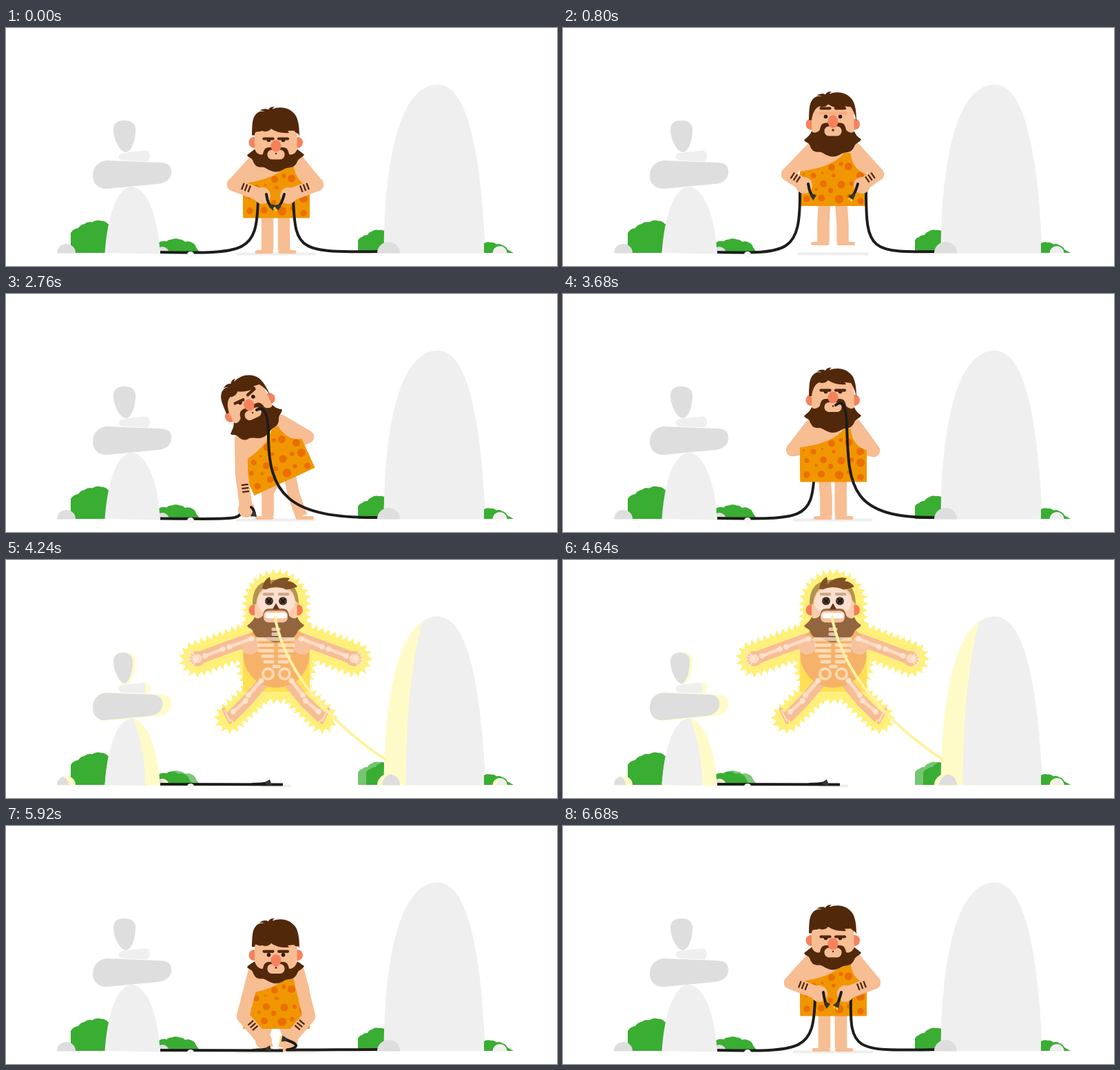
These frames come from a looping animation (800x345 px, 6720 ms). An HTML page with a canvas:

```html
<!DOCTYPE html>
<html lang="en">
<head>
<meta charset="utf-8">
<title>Caveman and cables</title>
<style>
  html, body { margin: 0; width: 100%; height: 100%; overflow: hidden; background: #fff; }
  canvas { display: block; width: 800px; height: 345px; }
</style>
</head>
<body>
<canvas id="stage"></canvas>
<script>
const LOOP = 6720;
const canvas = document.getElementById('stage');
const ctx = canvas.getContext('2d');
const dpr = window.devicePixelRatio || 1;
canvas.width = 800 * dpr;
canvas.height = 345 * dpr;

const SKIN = '#f7bd93', BROWN = '#52280b', ORANGE = '#f09600', SPOT = '#ea6e05',
  PINK = '#f5825c', BLACK = '#1d1d1b', GREEN = '#3aad33', PALE = '#efefef',
  GREY = '#dedede', GLOW = '#fff07a', RIM = '#fffbc9', BONE = 'rgba(255,232,212,.72)';

// ---------- poses ----------
const base = {
  hip: [392.5, 275.5], rot: [0], look: [1], wide: [0], brow: [0], lift: [0],
  le: [330, 227], lh: [372, 243], re: [452, 227], rh: [410, 243],
  lk: [379.5, 295], la: [379.5, 322], lf: [0],
  rk: [403.5, 295], ra: [403.5, 322], rf: [0],
  lc: [224, 325, 350, 327, 364, 327, 366, 248], lt: [378, 241, 380, 256, 386, 259],
  rc: [545, 324, 425, 325.5, 420, 324, 417, 248], rt: [404, 241, 400, 256, 395, 259],
  plug: [1, 1], peace: [0], back: '', hair: 'flat', mode: ''
};
const pose = (o, from = base) => ({ ...from, ...o });

const settle = pose({
  lt: [378, 241, 380, 256, 383, 259], rt: [404, 241, 400, 256, 398, 259],
  rc: [545, 324, 425, 326, 416, 329, 418, 248]
});
const stand = pose({
  hip: [392.5, 272.5], look: [0.2], wide: [0.5],
  lh: [357, 240], rh: [426, 240],
  lc: [224, 325, 335, 327, 350, 327, 351, 246], lt: [363, 238, 365, 252, 370, 256],
  rc: [545, 324, 440, 325.5, 433, 324, 432, 246], rt: [420, 238, 416, 252, 412, 256]
});
const hop = pose({
  hip: [392.5, 258], look: [0], wide: [1], le: [326, 212], re: [457, 212],
  lh: [350, 228], rh: [434, 228],
  lk: [378, 284], la: [378, 310], rk: [406, 284], ra: [406, 310],
  lc: [224, 325, 330, 327, 345, 327, 344, 233], lt: [356, 226, 358, 240, 363, 244],
  rc: [545, 324, 445, 325.5, 440, 324, 440, 233], rt: [428, 226, 424, 240, 420, 244]
});
const taste = pose({
  hip: [404.5, 272], rot: [-24.7], look: [0], brow: [1],
  le: [323, 259], lh: [292, 225], re: [430, 152], rh: [377, 154],
  lk: [380, 288], la: [380, 322], rk: [418, 292], ra: [424, 321], rf: [-45],
  lc: [224, 325, 312, 327, 303, 308, 294, 240], lt: [296, 224, 303, 232, 310, 238],
  rc: [545, 324, 425, 324, 385, 262, 381, 166], rt: [373, 149, 365, 156, 366, 168],
  plug: [1, 0], peace: [1]
});
const tap = pose({ rf: [0], ra: [424, 322] }, taste);
const tuck = pose({
  re: [438, 207], rh: [420, 215],
  rc: [545, 324, 408, 326, 380, 290, 381, 200], rt: [381, 200, 380, 159, 364, 168],
  back: 'r'
}, tap);
const place = pose({
  le: [342, 260], lh: [349, 312], peace: [0], ra: [429, 322],
  lc: [224, 325.5, 330, 326, 342, 329, 341, 312], lt: [356, 309, 361, 313, 360, 319]
}, tuck);
const wait = pose({
  hip: [392.5, 272.5], look: [0],
  le: [333, 226], lh: [360, 222], re: [451, 227], rh: [425, 222],
  lk: [382, 295], la: [382, 322], rk: [403, 295],
  lc: [224, 325, 350, 327, 361, 327, 365, 260], lt: [364, 260, 364, 256, 364, 252],
  rc: [545, 324, 415, 326, 415, 280, 412, 190], rt: [412, 190, 411, 149, 396, 161],
  plug: [0, 0], back: 'lr'
});
const shock = pose({
  hip: [392.5, 191], look: [0], wide: [1],
  le: [318, 128], lh: [278, 143], re: [465, 128], rh: [505, 143],
  lk: [350, 204], la: [325, 229], lf: [64], rk: [433, 204], ra: [459, 229], rf: [-64],
  lc: [224, 325, 290, 325, 340, 325.5, 402, 325.5], lt: [358, 325, 372, 325, 381, 323],
  rc: [552, 290, 470, 235, 408, 165, 392, 90], rt: [392, 90, 391, 86, 391, 82],
  plug: [1, 0], hair: 'wild', mode: 'lit'
});
const run = pose({
  hip: [392.5, 221], lift: [1],
  le: [323, 120], lh: [292, 150], re: [462, 132], rh: [487, 169],
  lk: [347, 195], la: [361, 229], lf: [-30], rk: [424, 245], ra: [444, 275], rf: [-50],
  rc: [545, 324, 490, 324, 450, 325, 408, 324.5], rt: [408, 324.5, 436, 319, 404, 309],
  plug: [1, 1], mode: ''
}, shock);
const fly = pose({
  hip: [392.5, 187], lift: [0.4], le: [324, 96], lh: [290, 92], re: [462, 88], rh: [493, 102],
  lk: [362, 205], la: [352, 234], rk: [416, 214], ra: [422, 246], rf: [-20]
}, run);
const land = pose({
  hip: [392.5, 285], look: [0.7], lift: [0], hair: 'flat',
  le: [328, 240], lh: [338, 272], re: [456, 240], rh: [446, 272],
  lk: [374, 303], la: [379.5, 322], lf: [0], rk: [410, 303], ra: [403.5, 322], rf: [0]
}, run);
const pick = pose({
  hip: [392.5, 294], look: [1.3], wide: [0.3],
  le: [344, 276], lh: [374, 311], re: [440, 276], rh: [412, 309]
}, land);

const keys = [
  [0, base], [400, base], [520, hop], [920, hop], [1040, stand],
  [1440, stand], [1640, tap], [1880, taste], [2080, tap], [2400, tuck], [2640, place],
  [2960, place], [3320, wait], [4100, wait], [4200, shock], [4800, shock], [4920, fly],
  [5200, run], [5400, land], [5560, land], [5760, pick], [5920, pick], [6240, settle],
  [6680, settle], [LOOP, base]
];

function poseAt(t) {
  const i = keys.findIndex(k => k[0] > t);
  const [t0, a] = keys[i - 1], [t1, b] = keys[i];
  const u = (t - t0) / (t1 - t0), e = u * u * (3 - 2 * u), p = {};
  for (const k in a)
    p[k] = Array.isArray(a[k]) ? a[k].map((v, j) => v + (b[k][j] - v) * e) : a[k];
  if (b === shock) Object.assign(p, { mode: 'lit', hair: 'wild' });
  if (t > 3440 && t < 4080) {
    const s = Math.sin((t - 3680) / 64 * Math.PI / 2) * 0.6;
    p.look[0] += s * 0.1;
    p.rc[4] += s * 3;
  }
  return p;
}

// ---------- drawing helpers ----------
const rad = d => d * Math.PI / 180;
const fill = (path, color) => { ctx.fillStyle = color; ctx.fill(typeof path === 'string' ? new Path2D(path) : path); };
function dot(x, y, r, color, ry = r) {
  ctx.beginPath();
  ctx.ellipse(x, y, r, ry, 0, 0, 7);
  ctx.fillStyle = color;
  ctx.fill();
}
function line(pts, width, color, cap = 'round') {
  ctx.beginPath();
  for (let i = 0; i < pts.length; i += 2) ctx.lineTo(pts[i], pts[i + 1]);
  Object.assign(ctx, { lineWidth: width, strokeStyle: color, lineCap: cap, lineJoin: 'round' });
  ctx.stroke();
}
function box(x, y, w, h, r, color) {
  ctx.beginPath();
  ctx.roundRect(x, y, w, h, r);
  ctx.fillStyle = color;
  ctx.fill();
}
function at(x, y, deg, draw) {
  ctx.save();
  ctx.translate(x, y);
  ctx.rotate(rad(deg));
  draw();
  ctx.restore();
}

// ---------- scenery ----------
function bush(p) {
  let d = `M${p[0]},${p[1]}L${p[2]},${p[3]}`;
  for (let i = 4; i < p.length; i += 2) {
    const dx = p[i] - p[i - 2], dy = p[i + 1] - p[i - 1];
    const cx = p[i - 2] + dx / 2 + dy * 0.25, cy = p[i - 1] + dy / 2 - dx * 0.25;
    d += i < p.length - 2 ? `Q${cx},${cy} ${p[i]},${p[i + 1]}` : `L${p[i]},${p[i + 1]}`;
  }
  return d + 'Z';
}
const rock = (x, r) => `M${x - r},326.5V326A${r},${r - 0.5} 0 0 1 ${x + r},326V326.5Z`;

// shape, colour, lit colour, shadow shift while lit, shadow stretch
const scenery = [
  [bush([94, 326, 94, 297, 105, 290, 114, 284, 125, 281.5, 138, 279.5, 148, 284, 156, 288, 160, 326]), GREEN, GREEN, 0],
  [bush([222, 326, 222, 311, 233, 309.5, 241, 306.5, 252, 306.5, 260, 310, 270, 311, 276, 318, 282, 326]), GREEN, '#7cc878', -10],
  [rock(227, 9.5), GREY, RIM, -6],
  ['M143.5,326C147,275 160,232 182,230C206,230 222,280 223.5,327.5Z', PALE, RIM, -21, 1.25],
  ['M146,192C135,193 126,201 126,214C126,227 136,234 147,233L221,226C233,225 241,217 240,208C240,198 233,195 222,195Z', GREY, RIM, -13],
  ['M170,181L202,177.5C210,177 211,190 205,193.5L170,192C161,191 162,182 170,181Z', PALE, RIM, -6],
  ['M172,134C181,134 189,138 188,149C188,160 183,180 174,180C165,180 156,160 156,148C156,138 162,134 172,134Z', GREY, RIM, -4],
  [rock(87.5, 13.5), GREY, RIM, -10],
  [bush([511, 326, 511, 308, 517, 303, 525, 300, 531, 295, 541, 293, 552, 296, 552, 326]), GREEN, '#74c670', 12],
  ['M548.5,326.5C549,190 572,82 627,82C672,82 690,190 696,326.5Z', PALE, RIM, 32, 1.25],
  [bush([694, 326, 694, 312, 704, 311, 712, 313.5, 721, 315, 728, 321, 737, 326]), GREEN, GREEN, 0],
  [rock(717, 10.5), PALE, RIM, 5]
].map(([d, ...rest]) => [new Path2D(d), ...rest]);
const frontRock = [new Path2D(rock(555.5, 16.5)), GREY, RIM, 7];

function block([path, color, glow, shift, stretch = 1], lit) {
  if (!lit || !shift) return fill(path, color);
  fill(path, glow);
  ctx.save();
  ctx.clip(path);
  ctx.translate(shift, 327 * (1 - stretch));
  ctx.scale(1, stretch);
  fill(path, color);
  ctx.restore();
}

// ---------- cables ----------
function cable(c, color) {
  ctx.beginPath();
  ctx.moveTo(c[0], c[1]);
  ctx.bezierCurveTo(...c.slice(2));
  Object.assign(ctx, { lineWidth: 4, strokeStyle: color, lineCap: 'butt' });
  ctx.stroke();
}
function cableTip(q, plug, color, spark) {
  ctx.beginPath();
  ctx.moveTo(q[0], q[1]);
  ctx.quadraticCurveTo(q[2], q[3], q[4], q[5]);
  Object.assign(ctx, { lineWidth: 4, strokeStyle: color, lineCap: 'round' });
  ctx.stroke();
  if (plug < 0.5) return;
  at(q[4], q[5], Math.atan2(q[5] - q[3], q[4] - q[2]) * 180 / Math.PI, () => {
    fill('M-4,-2L3,-4.5L4,4.5L-4,2Z', '#343432');
    if (spark) {
      dot(5, -3, 1.7, '#ffdf2e');
      dot(6, 1, 1.2, '#ffdf2e');
    }
  });
}

// ---------- body ----------
const spots = [
  [-2.5, -56, 5], [11, -61, 3], [22, -57.5, 5.5], [-29, -44, 4], [0.5, -44, 2.7], [39, -44, 5.5],
  [-38.5, -31, 3.5], [-14.5, -32, 5], [-4, -22.5, 3.7], [11.5, -31, 5.5], [26.5, -32, 3.2],
  [39.5, -28, 6], [-25, -24, 2.2], [-38.5, -10.5, 4.7], [-17.5, -11.5, 5], [8.5, -10, 6.2],
  [23, -14, 3.2], [39.5, -7, 4.7], [-16, -48, 1.7], [-43, -46, 1.7]
];
function torso(lift) {
  fill('M-48,-15V-50C-47,-70 -38,-85 -25,-90H25C38,-85 48,-70 48.5,-50V-15Z', SKIN);
  const k = lift, cloth = new Path2D(`M-48.5,-50C-20,-54 5,-62 15,-77H25C27,-60 35,-50 48.5,-46V${-4 * k}
    C30,${2 * k} 5,${2 * k} ${-8 - 4 * k},${-2 * k}L${-48 - 4 * k},${-22 * k}C${-48.5 - 8 * k},${-30 * k} ${-48.5 - 7 * k},-42 -48.5,-50Z`);
  fill(cloth, ORANGE);
  ctx.save();
  ctx.clip(cloth);
  for (const [x, y, r] of spots) dot(x, y, r, SPOT);
  ctx.restore();
}
const crowns = {
  flat: `M-35,-6C-35,-20 -34,-28 -32,-32C-28,-40 -22,-42 -16,-40C-20,-42 -23,-42 -24,-41
    C-20,-45 -14,-45 -11,-43C-10,-46 -6,-48 -2,-47C-4,-46 -5,-45 -5,-44C8,-49 22,-45 29,-34C33,-26 34,-16 34,-4`,
  wild: `M-35,-6C-35,-20 -33,-28 -32,-32C-29,-40 -27,-46 -23,-53C-20,-50 -17,-45 -15,-41
    C-9,-49 -3,-60 5,-67C7,-60 8,-54 7,-48C12,-51 16,-51 21,-51C19,-47 17,-44 17,-41C20,-42 24,-42 27,-38L25,-35C32,-26 34,-16 34,-4`
};
const beardPath = s => `M-31,${10 + s * 0.3}C-33,16 -38,19 -42,23C-40,27 -35,26 -33.5,31C-31,38 -27,41 -20,40C-13,41 -9,47 0,47
  C8,47 11,42 18,41C25,41 29,37 31,32C33,27 38,27 41,22C37,19 33,16 31,${10 + s * 0.3}
  C28,${14 + s * 0.6} 22,${12 + s * 0.8} 19,${8 + s}C18,${2 + s} 16,${-2 + s} 10,${-2 + s}H-10
  C-16,${-2 + s} -18,${2 + s} -19,${8 + s}C-22,${12 + s * 0.8} -28,${14 + s * 0.6} -31,${10 + s * 0.3}Z`;

function head(p) {
  const L = p.look[0], s = 13.5 * L, w = p.wide[0], b = p.brow[0];
  ctx.translate(-0.5, -118.5 + 4.5 * L);
  for (const x of [-32, 31.5]) dot(x, 4.5 * L, 7.5, PINK, 8);
  box(-31, -33, 61.5, 62, 12, SKIN);
  fill(crowns[p.hair] + `C33,-10 31,${-18 + s * 0.8} 26,${-25 + s * 0.9}L17,${-26 + s}L19,${-23 + s}
    C8,${-22 + s} -1,${-25 + s} -7,${-29 + s}C-10,${-25 + s} -16,${-24 + s} -20,${-26 + s}C-27,${-23 + s} -30,-14 -31,-6Z`, BROWN);
  fill(beardPath(s), BROWN);
  ctx.translate(0, s);
  if (w > 0.3) line([-18, -16, 18, -16], 5, '#f6ad83');
  for (const x of [-10.5, 10.5]) dot(x, -12.5 + 1.5 * w, 2.8, '#2a1a10');
  line([-17.5, -14.5 - 8.5 * w, -4.5, -14.5 - 8.5 * w], 4.2, BROWN);
  at(10.5, -14.5 - 8.5 * w - 5.5 * b, -18 * b, () => line([-6.5, 0, 6.5, 0], 4.2, BROWN));
  const m = -1.5 * L;
  box(-12.5, 3 + m, 25, 14, 6.5, SKIN);
  dot(0, -4, 7.5, PINK, 8.5 + w);
  dot(0, 8.5 + m, 1.2 + 0.6 * w, BROWN);
}

const world = (p, x, y) => {
  const a = rad(p.rot[0]), c = Math.cos(a), s = Math.sin(a);
  return [p.hip[0] + x * c - y * s, p.hip[1] + x * s + y * c];
};
const shoulder = (p, side) => world(p, side === 'l' ? -32 : 32, -82);

const upperArm = (p, side) => line([...shoulder(p, side), ...p[side + 'e']], 18.5, SKIN);
function forearm(p, side) {
  const [ex, ey] = p[side + 'e'], [hx, hy] = p[side + 'h'];
  line([ex, ey, hx, hy], 18.5, SKIN);
  dot(hx, hy, 12, SKIN);
  if (side === 'l' && p.peace[0] > 0.3) {
    const k = p.peace[0];
    line([hx - 1, hy - 5, hx - 2, hy - 24 * k], 6, SKIN);
    line([hx + 3, hy - 4, hx + 13 * k, hy - 21 * k], 6, SKIN);
  }
  const wristed = p.peace[0] < 0.3 || side === 'r';
  if (wristed && !(side === 'r' && p.brow[0] > 0.6))
    at(ex + (hx - ex) * 0.42, ey + (hy - ey) * 0.42, Math.atan2(hy - ey, hx - ex) * 180 / Math.PI, () => {
      const flip = side === 'l' ? 1 : -1;
      for (const x of [-5, 0, 5]) line([x, -7.5 * flip, x, 2.5 * flip], 2.3, BROWN, 'butt');
    });
}
function foot(p, side) {
  const s = side === 'l' ? -1 : 1;
  at(...p[side + 'a'], p[side + 'f'][0], () => line([-6 * s, 2.5, 15.5 * s, 2.5], 5, SKIN));
}
function leg(p, side) {
  const top = world(p, side === 'l' ? -13 : 11, -8);
  line([...top, ...p[side + 'k'], ...p[side + 'a']], 17.5, SKIN, 'butt');
  foot(p, side);
}

// ---------- electrified body ----------
function spiky(x0, y0, x1, y1, r, phase) {
  line([x0, y0, x1, y1], r * 2 - 3, GLOW);
  const len = Math.hypot(x1 - x0, y1 - y0), a = Math.atan2(y1 - y0, x1 - x0);
  const arc = Math.PI * r, total = 2 * (len + arc), n = Math.round(total / 9.5);
  for (let i = 0; i < n; i++) {
    let d = ((i + phase) / n) * total, x, y, dir;
    if (d < len) { x = x0 + Math.cos(a) * d; y = y0 + Math.sin(a) * d; dir = a - Math.PI / 2; }
    else if (d < len + arc) { x = x1; y = y1; dir = a - Math.PI / 2 + (d - len) / r; }
    else if (d < 2 * len + arc) { d -= len + arc; x = x1 - Math.cos(a) * d; y = y1 - Math.sin(a) * d; dir = a + Math.PI / 2; }
    else { x = x0; y = y0; dir = a + Math.PI / 2 + (d - 2 * len - arc) / r; }
    at(x, y, dir * 180 / Math.PI, () => fill(`M${r - 3},-5Q${r},-2 ${r + 6},1Q${r},2 ${r - 3},5Z`, GLOW));
  }
}
function bone(x0, y0, x1, y1) {
  line([x0, y0, x1, y1], 5, BONE);
  for (const [x, y] of [[x0, y0], [x1, y1]]) dot(x, y, 4.2, BONE);
}
function litHead() {
  ctx.translate(-0.5, -118.5);
  for (const x of [-32, 31.5]) dot(x, 0, 7.5, '#f77c58', 8);
  box(-31, -37, 61.5, 66, 16, '#f9cdaa');
  fill('M-34,-8C-34,-28 -28,-43 0,-44C26,-43 33,-28 33,-8L28,-14C26,-30 17,-34 0,-34C-18,-34 -26,-30 -29,-8Z', '#b49350');
  fill('M-20,-31C-19,-39 -15,-45 -9,-48C-8,-43 -8,-40 -8,-37C-2,-45 10,-49 20,-46L17,-42C23,-42 28,-38 31,-34C20,-28 -8,-27 -20,-31Z', '#805225');
  dot(0, -12, 27, '#fde0cd', 21);
  fill(beardPath(0), '#93653f');
  for (const x of [-19, 3]) box(x, -25, 16, 4, 1, '#caa58c');
  for (const x of [-10, 10]) {
    dot(x, -13, 6, '#49372d');
    line([x - 3, -16, x + 3, -10], 1.5, '#17120f');
    line([x + 3, -16, x - 3, -10], 1.5, '#17120f');
  }
  fill('M0,-10L5,-1H-5Z', '#6b2f1a');
  box(-18, 1, 35, 17, 7, '#f5c3a2');
  box(-15.5, 4, 31, 8, 3, '#fff');
}
function litBody(p, step) {
  const [x, y] = p.hip, phase = step % 2 * 0.5;
  spiky(x, y - 128, x, y - 90, 45, phase);
  spiky(x, y - 68, x, y - 41, 54, phase);
  for (const side of ['l', 'r']) {
    const s = shoulder(p, side);
    spiky(s[0], s[1] + 4, ...p[side + 'h'], 22, phase);
    spiky(x + (side === 'l' ? -14 : 14), y - 12, ...p[side + 'a'], 18, phase);
  }
  box(x - 48.5, y - 86, 97, 86, [30, 30, 0, 0], '#ffdf55');
  for (const side of ['l', 'r']) {
    const f = side === 'l' ? -1 : 1, e = p[side + 'e'], h = p[side + 'h'], k = p[side + 'k'], a = p[side + 'a'];
    const s = shoulder(p, side);
    line([s[0], s[1] + 4, ...e, ...h], 18, '#f6bd96');
    dot(...h, 11, '#f6bd96');
    line([x + 14 * f, y - 20, ...k, ...a], 17, '#f6bd96', 'butt');
    foot(p, side);
  }
  dot(x, y - 54, 48, '#f6b269');
  for (const f of [-1, 1]) dot(x + 38 * f, y - 67, 13, '#f7c39f');
  for (const side of ['l', 'r']) {
    const f = side === 'l' ? -1 : 1, e = p[side + 'e'], h = p[side + 'h'], k = p[side + 'k'], a = p[side + 'a'];
    bone(x + 36 * f, y - 77, e[0] - 6 * f, e[1] - 2);
    bone(e[0] + 3 * f, e[1] + 1, h[0] - 11 * f, h[1] - 4);
    dot(...h, 6.5, BONE);
    for (const d of [-48, -22, 4, 30, 56])
      line([h[0], h[1], h[0] + 16 * f * Math.cos(rad(d)), h[1] + 16 * Math.sin(rad(d))], 2.4, BONE);
    bone(x + 22 * f, y - 16, k[0] - 2 * f, k[1] - 8);
    bone(k[0] + 2 * f, k[1], a[0] - 5 * f, a[1] - 9);
    at(...a, p[side + 'f'][0], () => line([-4 * f, 2, 13 * f, 2], 2.5, BONE));
    ctx.beginPath();
    ctx.arc(x + 12 * f, y - 26, 7.5, 0, 7);
    Object.assign(ctx, { lineWidth: 4, strokeStyle: BONE });
    ctx.stroke();
  }
  at(x, y, 0, litHead);
  box(x - 7, y - 93, 13, 5, 2, BONE);
  box(x - 7, y - 86, 13, 5, 2, BONE);
  box(x - 29, y - 79, 56, 5.5, 2, BONE);
  [[28, -70], [27, -62], [22, -54], [19, -46]].forEach(([w, dy]) => {
    box(x - w, y + dy, w - 3, 5, 2.5, BONE);
    box(x + 2, y + dy, w - 3, 5, 2.5, BONE);
  });
  box(x - 6, y - 39, 12, 5, 2, BONE);
}

// ---------- frame ----------
function body(p) {
  const sides = ['l', 'r'], behind = s => p.back.includes(s);
  if (behind('l')) cable(p.lc, BLACK);
  for (const s of sides) if (behind(s)) { upperArm(p, s); line([...p[s + 'e'], ...p[s + 'h']], 18.5, SKIN); }
  for (const s of sides) leg(p, s);
  at(...p.hip, p.rot[0], () => torso(p.lift[0]));
  if (p.lift[0] > 0.5) { line([...p.lk, ...p.la], 17.5, SKIN, 'butt'); dot(...p.lk, 8.75, SKIN); foot(p, 'l'); }
  for (const s of sides) if (!behind(s)) upperArm(p, s);
  at(...p.hip, p.rot[0], () => head(p));
  if (!behind('l')) cable(p.lc, BLACK);
  cable(p.rc, BLACK);
  for (const s of sides) if (!behind(s)) forearm(p, s);
}

function draw(t) {
  const p = poseAt(t), step = Math.floor(t / 40), lit = p.mode === 'lit';
  ctx.setTransform(dpr, 0, 0, dpr, 0, 0);
  ctx.fillStyle = '#fff';
  ctx.fillRect(0, 0, 800, 345);
  for (const item of scenery) block(item, lit);
  const half = 58 - Math.max(0, 272 - p.hip[1]) * 0.44;
  box(392 - half, 325.5, half * 2, 4, 2, '#eeeeee');
  if (lit) {
    cable(p.lc, BLACK);
    litBody(p, step);
    cable(p.rc, '#fff2a0');
  } else body(p);
  if (!p.back.includes('l')) cableTip(p.lt, p.plug[0], BLACK, false);
  cableTip(p.rt, p.plug[1], lit ? '#fff2a0' : BLACK, step % 4 !== 1);
  dot(268, 328.5, 5, '#f7f7f7', 4.5);
  block(frontRock, lit);
}

const start = performance.now();
function tick() {
  draw((performance.now() - start) % LOOP);
  requestAnimationFrame(tick);
}
tick();
</script>
</body>
</html>
```
